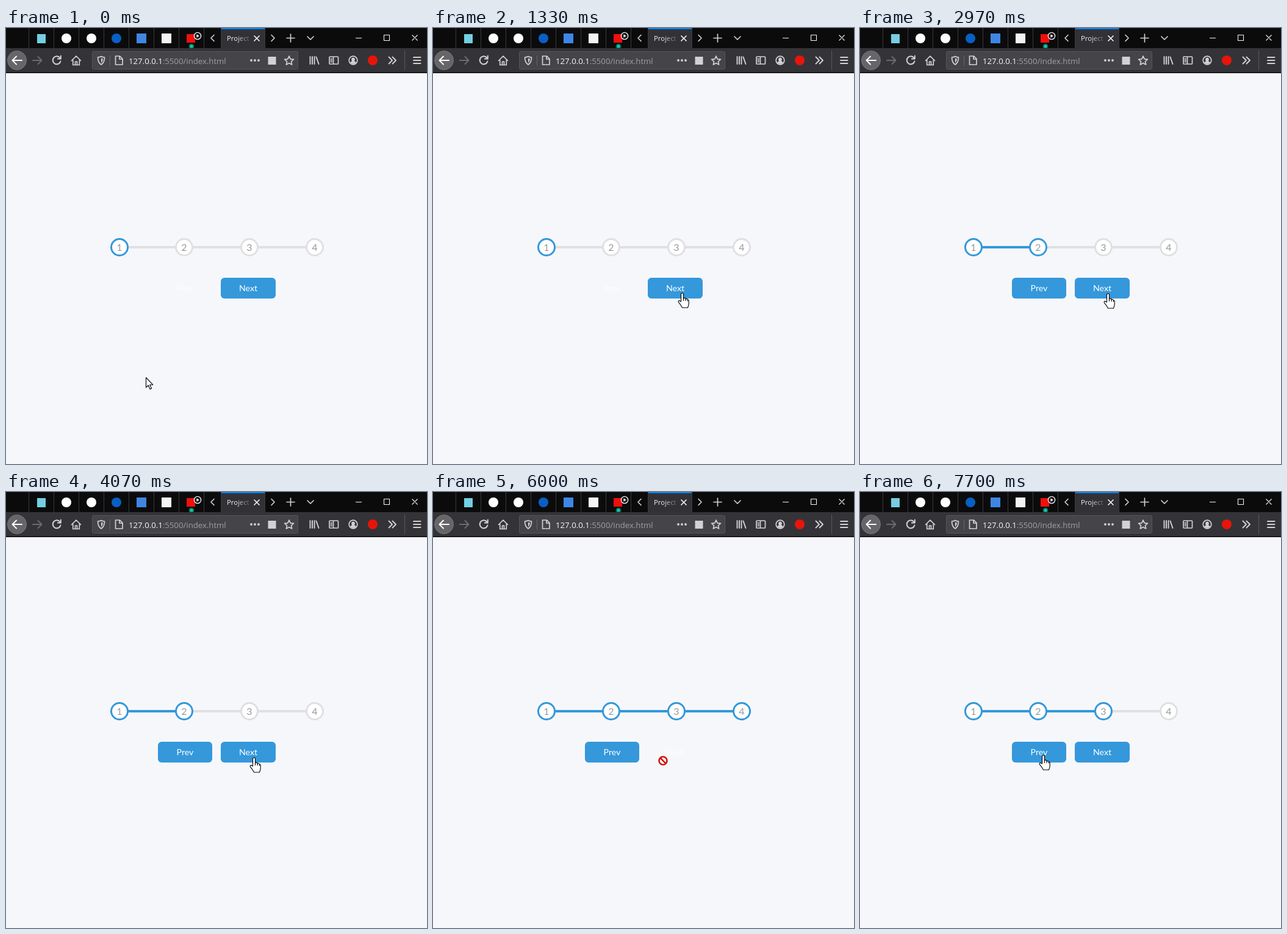
An HTML page that plays this animation: 690x714 px, repeating every 8 s.

```html
<!DOCTYPE html>
<html lang="en">
<head>
<meta charset="utf-8">
<title>Progress steps</title>
<style>
html, body { margin: 0; width: 100%; height: 100%; overflow: hidden; background: #f6f7fa; }
svg { display: block; }
.ui { font-family: "Open Sans", sans-serif; }
.page { font-family: Lato, sans-serif; text-anchor: middle; }
.icon { fill: none; stroke: #d2d2d5; stroke-width: 1.7; stroke-linecap: round; stroke-linejoin: round; }
.cur { stroke-width: 1.1; stroke-linejoin: round; }
</style>
</head>
<body>
<svg width="690" height="714" viewBox="0 0 690 714">
  <defs>
    <linearGradient id="fade" gradientUnits="userSpaceOnUse" x1="376" x2="402" y1="0" y2="0">
      <stop offset="0" stop-color="#f5f5f7"/>
      <stop offset="1" stop-color="#f5f5f7" stop-opacity=".12"/>
    </linearGradient>
  </defs>
  <rect width="690" height="714" fill="#f6f7fa"/>

  <!-- tab strip -->
  <rect width="690" height="33" fill="#0b0b0c"/>
  <g id="seps" stroke="#3a3a3d"></g>
  <rect x="51" y="10" width="14" height="15" fill="#74cfe0"/>
  <circle cx="99" cy="17" r="8" fill="#fff"/>
  <circle cx="140" cy="17" r="8" fill="#fff"/>
  <circle cx="181" cy="17" r="8" fill="#0a5fc4"/>
  <rect x="214" y="9" width="16" height="16" fill="#3f86e4"/>
  <rect x="255" y="9" width="16" height="16" fill="#f4f4f6"/>
  <rect x="296" y="10" width="14" height="14" fill="#f0100c"/>
  <circle cx="314" cy="13" r="5.6" fill="#111113" stroke="#f4f4f6" stroke-width="1.4"/>
  <path d="M312.4 10.2v5.6l4.4-2.8z" fill="#f4f4f6"/>
  <circle cx="304" cy="30" r="4.5" fill="#075c4c"/>
  <circle cx="304" cy="30" r="2.8" fill="#12c49a"/>
  <rect x="353" y="0" width="71" height="33" fill="#323236"/>
  <rect x="353" y="0" width="71" height="2" fill="#0a84ee"/>
  <text class="ui" x="362" y="21" font-size="11.3" fill="url(#fade)">Project</text>
  <g class="icon">
    <path d="M341 11.500l-5 5 5 5M435 11.500l5 5-5 5M460 16.500h13M466.500 10v13M494 14l5 5 5-5"/>
    <path d="M407 13l8 8M415 13l-8 8" stroke="#f4f4f6"/>
    <path d="M573 16.500h10M619.500 11.500h9v9h-9zM665.500 11.500l9 9M674.500 11.500l-9 9" stroke="#f2f2f4" stroke-width="1.1" stroke-linecap="butt"/>
  </g>

  <!-- toolbar -->
  <rect y="33" width="690" height="40" fill="#343438"/>
  <rect y="72.500" width="690" height="1.500" fill="#0e0e10"/>
  <circle cx="18" cy="53" r="15.500" fill="#66666a" stroke="#77777b"/>
  <rect x="141.500" y="38.500" width="337" height="29" rx="2" fill="#454549" stroke="#55555a"/>
  <path d="M170.500 45v17" stroke="#66666a"/>
  <path d="M653.500 37v32" stroke="#5a5a5e"/>
  <g class="icon">
    <path d="M26 53H10.500M17 46.500L10.500 53l6.500 6.500" stroke="#fff" stroke-width="2"/>
    <path d="M44 53h14.500M52.500 47l6 6-6 6" stroke="#6c6c70" stroke-width="1.900"/>
    <path d="M88.500 49a6.500 6.500 0 1 0 1 5.500M89.800 45.500v5h-5" stroke-width="2"/>
    <path d="M107.500 53.500l7.500-7.500 7.500 7.500M109.700 52v8.500h10.600V52M113.500 60v-5h3v5"/>
    <path d="M156 46.500c2 1.200 3.500 1.500 5.500 1.500 0 6-1.500 9.500-5.500 12-4-2.500-5.500-6-5.500-12 2 0 3.500-.3 5.500-1.500z"/>
    <path d="M156 49.500v7.500c1.800-1.600 2.600-3.600 2.800-6.500z" fill="#d2d2d5" stroke="none"/>
    <path d="M179.500 46h7l4.500 4.500V60h-11.500zM186 46v5h5"/>
    <path d="M464 46l2.200 4.800 5.200.6-3.900 3.500 1.100 5.100-4.600-2.600-4.600 2.600 1.100-5.100-3.900-3.500 5.200-.6z"/>
    <path d="M498.500 47v12M502 47v12M505.500 47v12M508.500 47.500l4 11.500" stroke-width="1.900"/>
    <path d="M531 47h12.500q1 0 1 1v10q0 1-1 1H531q-1 0-1-1V48q0-1 1-1zM536.500 47v12M532.300 50.500h2M532.300 53h2M532.300 55.500h2"/>
    <circle cx="569" cy="53" r="6.800"/>
    <path d="M627.500 47.500l5.500 5.500-5.500 5.500M633.500 47.500L639 53l-5.500 5.500M668 48h11.500M668 53h11.500M668 58h11.500" stroke-width="1.900"/>
  </g>
  <path d="M564.500 57.200q0-2.700 3-3a3 3 0 1 1 3 0q3 .3 3 3-4.500 3.500-9 0z" fill="#d2d2d5"/>
  <g fill="#d2d2d5">
    <circle cx="402" cy="53" r="1.900"/><circle cx="408" cy="53" r="1.900"/><circle cx="414" cy="53" r="1.900"/>
    <rect x="429.500" y="47" width="13" height="13"/>
  </g>
  <circle cx="601" cy="53" r="8" fill="#e8140c"/>
  <text class="ui" x="201" y="58.500" font-size="13.200" fill="#a0a0a3"><tspan fill="#f7f7f9">127.0.0.1</tspan>:5500/index.html</text>

  <!-- page -->
  <rect x="171" y="357" width="350" height="4" fill="#e0e0e2"/>
  <rect id="bar" x="171" y="357" height="4" fill="#3498db"/>
  <g id="steps" class="page" font-size="16" fill="#999"></g>
  <g id="buttons" class="page" font-size="14.200"></g>

  <g id="cursor">
    <path class="cur" fill="#fff" stroke="#000" d="M.5.500v16.200l3.700-3.500 2.900 6.200 2.500-1.100-2.900-6.100h5z"/>
    <g class="cur" fill="#fff" stroke="#000">
      <path d="M-1.500 13V1a2 2 0 0 1 4 0V8a2 2 0 0 1 3.700 1 2 2 0 0 1 3.300 1 1.600 1.600 0 0 1 1.700 2v4q0 3-1.700 7H.5q-2-4-6-8.800c-1.300-2 .7-3.700 2.300-2.200z"/>
      <path d="M2.500 7.500v4.200M6.100 9v3M9.400 10v2.500" fill="none"/>
    </g>
    <g fill="none" stroke="#d4120a" stroke-width="2.600">
      <circle r="6.500" fill="#fff"/>
      <path d="M-4.600-4.600l9.200 9.200"/>
    </g>
  </g>
</svg>
<script>
const LOOP = 8000, STEP_TIME = 400;
const ON = [52, 152, 219], OFF = [224, 224, 226];
const $ = id => document.getElementById(id);
const clamp = v => Math.min(1, Math.max(0, v));

function add(parent, tag, attrs, text) {
  const el = document.createElementNS("http://www.w3.org/2000/svg", tag);
  for (const k in attrs) el.setAttribute(k, attrs[k]);
  if (text) el.textContent = text;
  parent.appendChild(el);
  return el;
}

for (let x = 37.5; x < 330; x += 41) add($("seps"), "path", { d: `M${x} 0v33` });
add($("seps"), "path", { d: "M352.5 0v33M424.5 0v33" });

const rings = [186, 292, 399, 506].map((x, i) => {
  const ring = add($("steps"), "circle", { cx: x, cy: 359, r: 13.5, fill: "#fff", "stroke-width": 3 });
  add($("steps"), "text", { x, y: 364.8 }, String(i + 1));
  return ring;
});

function button(x, width, label) {
  const box = add($("buttons"), "rect", { x, y: 409, width, height: 34, rx: 6, fill: "#3498db" });
  const text = add($("buttons"), "text", { x: x + width / 2, y: 431 }, label);
  return on => {
    box.setAttribute("visibility", on ? "visible" : "hidden");
    text.setAttribute("fill", on ? "#fff" : "#fdfdfe");
  };
}
const setPrev = button(249, 89, "Prev"), setNext = button(352, 90, "Next");

// CSS "ease": cubic-bezier(.25, .1, .25, 1)
function ease(x) {
  if (x <= 0 || x >= 1) return clamp(x);
  let lo = 0, hi = 1, u = 0.5;
  for (let i = 0; i < 20; i++) {
    u = (lo + hi) / 2;
    const bx = 0.75 * u * (1 - u) + u ** 3;
    if (bx < x) lo = u; else hi = u;
  }
  return 0.3 * u * (1 - u) ** 2 + 3 * u * u * (1 - u) + u ** 3;
}

// click time, change of level
const clicks = [[2640, 1], [4055, 1], [5145, 1], [6910, -1]];

// time, x, y of the pointer
const path = [
  [0, 229, 572], [30, 229, 572], [530, 208, 438], [590, 215, 436], [700, 380, 414],
  [970, 380, 414], [1150, 418, 428], [1330, 408, 435], [1530, 408, 435], [1570, 406, 434],
  [1770, 406, 434], [1820, 394, 434], [1880, 417, 436], [1930, 405, 435], [2070, 405, 435],
  [2130, 406, 436], [5570, 406, 436], [5670, 406, 440], [5930, 406, 440], [6000, 377, 440],
  [6060, 377, 440], [6130, 318, 434], [6250, 296, 428], [6400, 303, 418], [6570, 303, 418],
  [6640, 294, 434], [6700, 300, 432]
];

function pointer(t) {
  const i = path.findIndex(k => k[0] > t);
  if (i < 0) return path[path.length - 1].slice(1);
  const [t0, x0, y0] = path[i - 1], [t1, x1, y1] = path[i];
  const f = (t - t0) / (t1 - t0);
  return [x0 + (x1 - x0) * f, y0 + (y1 - y0) * f];
}

const shapes = [...$("cursor").children];

function draw(t) {
  let level = 0, step = 0;
  for (const [at, by] of clicks) {
    level += by * ease((t - at) / STEP_TIME);
    if (t >= at) step += by;
  }
  $("bar").setAttribute("width", 350 * level / 3);
  rings.forEach((ring, i) => {
    const m = clamp(level - i + 1);
    ring.setAttribute("stroke", `rgb(${OFF.map((c, j) => Math.round(c + (ON[j] - c) * m))})`);
  });
  setPrev(step > 0);
  setNext(step < 3);

  const [x, y] = pointer(t);
  const overPrev = x >= 249 && x <= 338, overNext = x >= 352 && x <= 442;
  let kind = 0;
  if (y >= 409 && y <= 443 && (overPrev || overNext)) {
    // the pointer keeps its shape until it next moves
    const enabled = overPrev ? step > 0 : step < 3 || t < 5600;
    kind = enabled ? 1 : 2;
  }
  shapes.forEach((s, i) => s.setAttribute("visibility", i === kind ? "visible" : "hidden"));
  $("cursor").setAttribute("transform", `translate(${x} ${y})`);
}

const start = performance.now();
function tick() {
  draw((performance.now() - start) % LOOP);
  requestAnimationFrame(tick);
}
tick();
</script>
</body>
</html>
```
